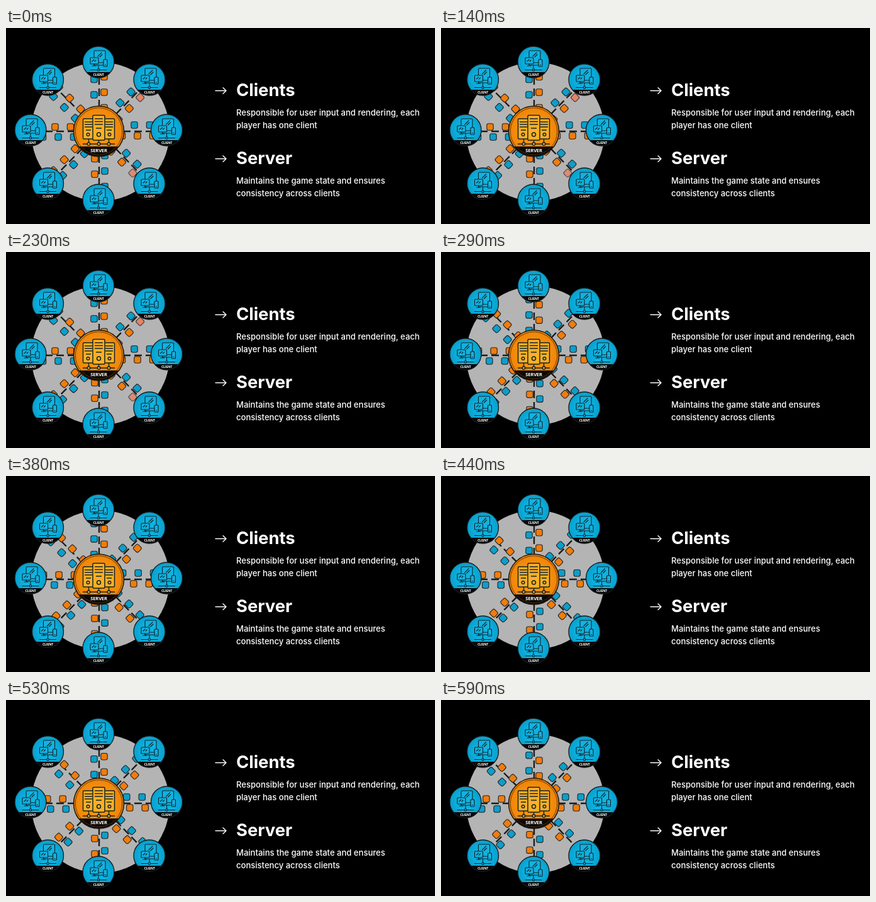
An HTML page that plays this animation: 682x311 px, repeating every 610 ms.

```html
<!DOCTYPE html>
<html lang="en">
<head>
<meta charset="utf-8">
<title>Clients and server</title>
<style>
  html, body { margin: 0; width: 100%; height: 100%; overflow: hidden; background: #000; }
  svg { display: block; }
  text { fill: #fff; font-family: Inter, sans-serif; font-optical-sizing: none; }
  .title { font-size: 27.4px; font-weight: 700; }
  .body { font-size: 13.05px; font-weight: 500; }
  .label { font-family: "Open Sans", sans-serif; font-weight: 700; text-anchor: middle; letter-spacing: -.2px; }
  .arrow { fill: none; stroke: #fff; stroke-width: 1.4; stroke-linecap: round; stroke-linejoin: round; }
  .spoke { stroke: #1c1c1c; stroke-width: 2.4; stroke-dasharray: 12 6; stroke-dashoffset: -2; }
  .icon { stroke: #10222b; stroke-linejoin: round; stroke-linecap: round; }
</style>
</head>
<body>
<svg width="682" height="311" viewBox="0 0 682 311">
  <defs>
    <radialGradient id="blue">
      <stop offset=".5" stop-color="#0cb1df"/><stop offset="1" stop-color="#089fcd"/>
    </radialGradient>
    <radialGradient id="orange">
      <stop offset=".5" stop-color="#f9930c"/><stop offset="1" stop-color="#ee8208"/>
    </radialGradient>
    <clipPath id="clientClip"><circle r="25"/></clipPath>
    <clipPath id="serverClip"><circle r="40"/></clipPath>

    <g id="client">
      <circle r="25" fill="url(#blue)"/>
      <rect x="-25" y="16" width="50" height="10" fill="#080808" clip-path="url(#clientClip)"/>
      <circle r="25" fill="none" stroke="#15191b" stroke-width="1.3"/>
      <g class="icon" fill="#12b2df" stroke-width="1.1">
        <path d="M0 5V11M-13 12.5H-2M2 12.5H13" fill="none"/>
        <circle cy="12.5" r="1.7"/>
        <rect x="-7" y="-18" width="18" height="23" rx="1.5"/>
        <path d="M-1-9L5-15M2-8L6-12M-7 1H11" fill="none"/>
        <rect x="-13" y="-7" width="13" height="10" rx="1"/>
        <path d="M-10-1L-7-4M-6-1L-4-3M-7 3V6M-10 6H-4" fill="none"/>
        <rect x="8" y="-4" width="6" height="11" rx="1"/>
        <path d="M10.5 4.5H11.5" fill="none"/>
      </g>
      <text class="label" y="22.3" font-size="5.3">CLIENT</text>
    </g>

    <g id="server">
      <circle r="40" fill="url(#orange)"/>
      <rect x="-40" y="24" width="80" height="16" fill="#0a0806" clip-path="url(#serverClip)"/>
      <circle r="40" fill="none" stroke="#1d1a16" stroke-width="1.6"/>
      <circle r="37.3" fill="none" stroke="#5b3508" stroke-width=".9"/>
      <g class="icon" stroke-width="1.5" fill="#fdb022">
        <path d="M-25 20H25M-16 12V20M0 14V20M16 12V20" fill="none"/>
        <g id="sideTower">
          <rect x="-25" y="-20" width="17" height="32" rx="1.5"/>
          <path d="M-22-15H-11M-22-11H-11M-22-7H-11M-20-2H-13" fill="none"/>
          <circle cx="-17" cy="5" r="2.3"/>
        </g>
        <use href="#sideTower" transform="scale(-1 1)"/>
        <rect x="-9.5" y="-25.5" width="19" height="39.5" rx="1.5"/>
        <path d="M-6-20H6M-6-15.5H6M-6-11H6M-4-5H4" fill="none"/>
        <circle cy="5" r="3"/>
        <circle cx="-16" cy="20" r="2.3"/><circle cy="20" r="2.3"/><circle cx="16" cy="20" r="2.3"/>
      </g>
      <text class="label" y="33" font-size="7.6">SERVER</text>
    </g>
  </defs>

  <circle cx="150" cy="164.5" r="110" fill="#b4b4b4"/>
  <g id="spokes"></g>
  <g id="packets" stroke="#242424" stroke-width="1.1"></g>
  <g id="clients"></g>
  <use href="#server" x="147.5" y="164"/>

  <path class="arrow" d="M333 99.5H350M345 94.8L350 99.5L345 104.2"/>
  <text class="title" x="366" y="108.4">Clients</text>
  <text class="body" x="366" y="138.7">Responsible for user input and rendering, each</text>
  <text class="body" x="366" y="158.7">player has one client</text>
  <path class="arrow" d="M333 207.5H350M345 202.8L350 207.5L345 212.2"/>
  <text class="title" x="366" y="216.4">Server</text>
  <text class="body" x="366" y="246.7">Maintains the game state and ensures</text>
  <text class="body" x="366" y="266.7">consistency across clients</text>
</svg>
<script>
const LOOP = 610, GAP = 24.5, STEP = GAP / 4;
const CENTER = { x: 147, y: 163 };

// Clockwise from the right: client place, lane shift and half width, start radii.
const spokes = [
  { x: 255.5, y: 162, shift: -0.5, half: 8.5, inward: 62, outward: 57 },
  { x: 228, y: 247, shift: 1.5, half: 7.5, inward: 61.5, outward: 56.5, fades: true },
  { x: 147, y: 273, shift: -2, half: 8, inward: 69, outward: 64 },
  { x: 66.5, y: 247, shift: -2, half: 8, inward: 71, outward: 66 },
  { x: 39, y: 162, shift: -2, half: 8, inward: 69, outward: 64 },
  { x: 66.5, y: 82, shift: -4, half: 8.2, inward: 69, outward: 64.5 },
  { x: 147, y: 54, shift: 1, half: 8, inward: 61, outward: 57 },
  { x: 228, y: 82, shift: 1.3, half: 8.3, inward: 59.5, outward: 55.5, fades: true }
];
const packets = [];

function add(parent, tag, attributes) {
  const node = document.createElementNS("http://www.w3.org/2000/svg", tag);
  for (const name in attributes) node.setAttribute(name, attributes[name]);
  return document.getElementById(parent).appendChild(node);
}

spokes.forEach((spoke, i) => {
  const { x, y, shift, half } = spoke;
  add("spokes", "line", { class: "spoke", x1: 148, y1: 164, x2: x + (x === 147), y2: y + (y === 162) * 2 });
  add("clients", "use", { href: "#client", x, y });
  for (const direction of [-1, 1]) {
    for (let k = -1; k <= 1; k++) {
      packets.push({
        node: add("packets", "rect", { x: -5.2, y: -5.2, width: 10.4, height: 10.4, rx: 2.6 }),
        angle: i * 45,
        lane: shift - direction * half,
        start: (direction < 0 ? spoke.inward : spoke.outward) + k * GAP,
        direction,
        fades: spoke.fades && direction < 0
      });
    }
  }
});

function draw(time) {
  const step = Math.max(0, Math.floor((time % LOOP + 10) / 150) - 1);
  for (const { node, angle, lane, start, direction, fades } of packets) {
    const radius = start + direction * step * STEP;
    const faded = fades && radius > 82;
    node.setAttribute("transform",
      `translate(${CENTER.x} ${CENTER.y}) rotate(${angle}) translate(${radius} ${lane})`);
    node.setAttribute("fill", faded ? "#ea7d5c" : direction < 0 ? "#f07d0c" : "#0c9fcb");
    node.setAttribute("opacity", faded ? Math.min(1, Math.max(0, (96 - radius) / 14)) : 1);
  }
}

const began = performance.now();
(function tick() {
  draw(performance.now() - began);
  requestAnimationFrame(tick);
})();
</script>
</body>
</html>
```
